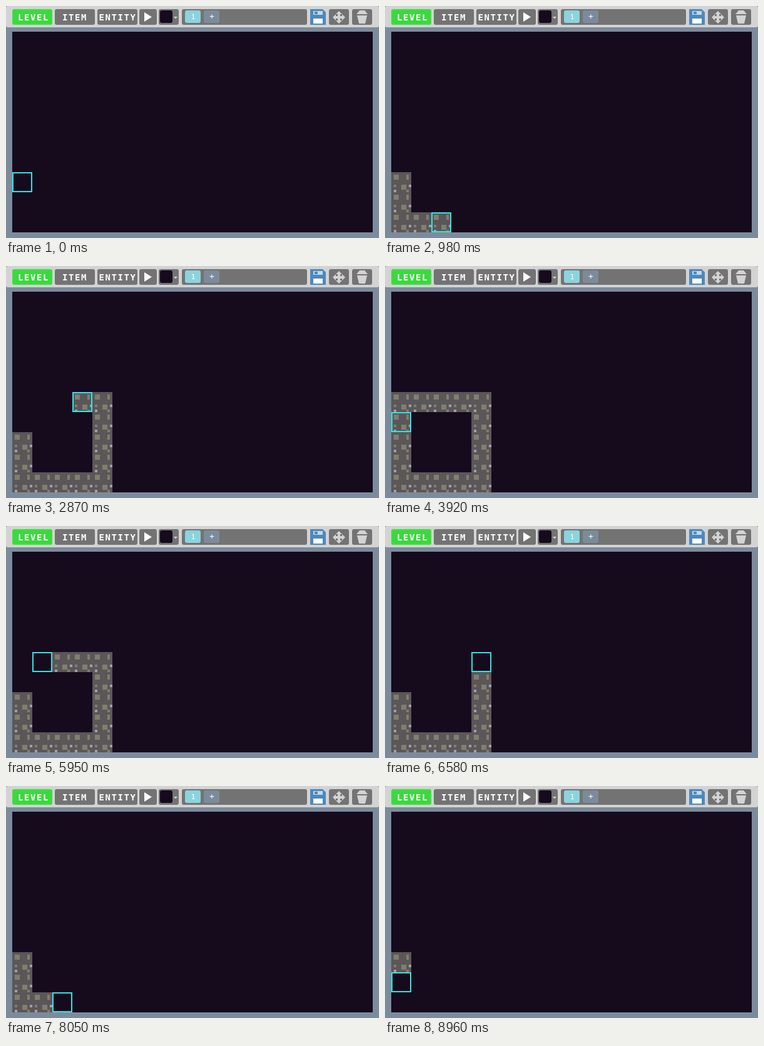
Write an HTML page that moves like this. It is 596 px wide and 370 px high and loops after 9310 ms.

```html
<!DOCTYPE html>
<html lang="en">
<head>
<meta charset="utf-8">
<title>Level editor</title>
<style>
  html, body { margin: 0; width: 100%; height: 100%; overflow: hidden; background: #7c8b9b; }
  svg { display: block; }
  text { fill: #fff; font: bold 14px "DejaVu Sans Mono", monospace; letter-spacing: 1.57px; }
  .tab { font-size: 11px; font-weight: normal; letter-spacing: 0; text-anchor: middle; }
  .button { fill: #737373; }
  .icon { fill: #d3d3d3; }
</style>
</head>
<body>
<svg width="596" height="370" viewBox="0 0 596 370">
  <defs>
    <g id="tile" shape-rendering="crispEdges">
      <path fill="#5b5758" d="M0 0h32v32H0z"/>
      <path fill="#827e70" d="M4 4h8v8H4zM24 4h4v8h-4zM4 20h4v4H4zM16 20h8v8h-8zM24 28h4v4h-4z"/>
      <path fill="#a09fb0" d="M28 20h4v4h-4zM4 28h4v4H4z"/>
    </g>
  </defs>

  <rect width="596" height="34" rx="3" fill="#d3d3d3"/>
  <rect x="11" y="6" width="62" height="23" rx="2" fill="#3dd740" stroke="#35e53a" stroke-width="2"/>
  <g class="button">
    <rect x="78" y="5" width="64" height="25" rx="3"/>
    <rect x="146" y="5" width="64" height="25" rx="3"/>
    <rect x="213" y="5" width="28" height="25" rx="3"/>
    <rect x="244" y="5" width="32" height="25" rx="3"/>
    <rect x="281" y="5" width="200" height="25" rx="3"/>
    <rect x="516" y="5" width="32" height="25" rx="3"/>
    <rect x="553" y="5" width="32" height="25" rx="3"/>
  </g>
  <text x="19" y="23">LEVEL</text>
  <text x="90" y="23">ITEM</text>
  <text x="148.500" y="23">ENTITY</text>
  <path fill="#fff" d="M221 10l12 7.500-12 7.500z"/>
  <rect x="246" y="7" width="20" height="20" rx="3" fill="#160a1d"/>
  <path class="icon" d="M268 17h6l-3 3.500z"/>
  <rect x="286" y="7" width="25" height="20" rx="3" fill="#8bd3de"/>
  <rect x="316" y="7" width="25" height="20" rx="3" fill="#7c8b9b"/>
  <text class="tab" x="299" y="21">1</text>
  <text class="tab" x="329" y="21" style="font-size:13px">+</text>

  <path fill="#4d89bd" d="M486 5h20l5 5v20h-25z"/>
  <path fill="#c3d8e8" d="M491 8h15v6h-15z"/>
  <path fill="#4d89bd" d="M493 9h5v4h-5z"/>
  <path fill="#fff" d="M491 20h15v8h-15z"/>
  <path class="icon" d="M532 8l5 5h-3v3h3v-3l5 5-5 5v-3h-3v3h3l-5 5-5-5h3v-3h-3v3l-5-5 5-5v3h3v-3h-3z"/>
  <path class="icon" d="M565 7h8l5 6h-18zM561 15h16l-3 13h-10z"/>

  <rect x="10" y="41" width="576" height="320" fill="#160a1d"/>
  <g transform="translate(10 41)">
    <g id="tiles"></g>
    <rect id="cursor" x="1" y="1" width="30" height="30" fill="none" stroke="#2ee5e5" stroke-width="2"/>
  </g>
</svg>
<script>
const LOOP = 9310, CELL = 32;
const NS = "http://www.w3.org/2000/svg";
const cursor = document.getElementById("cursor");
const tiles = document.getElementById("tiles");

// Cells around the room, walked forwards to paint and backwards to erase
const moves = "DDRRRRUUUULLLLD";
const steps = { D: [0, 1], U: [0, -1], R: [1, 0], L: [-1, 0] };
const path = [[0, 7]];
for (const move of moves) {
  const [x, y] = path[path.length - 1], [dx, dy] = steps[move];
  path.push([x + dx, y + dy]);
}

const paintTimes = [70, 350, 560, 840, 980, 1260, 1610, 2030,
  2240, 2450, 2660, 2870, 3080, 3290, 3500, 3920];
const eraseTimes = [5320, 5390, 5950, 6160, 6300, 6510, 6650, 6860,
  7280, 7560, 7840, 7980, 8120, 8540, 8960];

const walls = path.map(([x, y]) => {
  const wall = document.createElementNS(NS, "use");
  wall.setAttribute("href", "#tile");
  wall.setAttribute("transform", `translate(${x * CELL} ${y * CELL})`);
  return tiles.appendChild(wall);
});

const countPast = (times, t) => times.filter(time => time <= t).length;

function draw(now) {
  const t = now % LOOP;
  const painted = countPast(paintTimes, t);
  const erased = countPast(eraseTimes, t);
  const last = path.length - 1;
  walls.forEach((wall, i) => {
    wall.style.display = i < painted && i <= last - erased ? "" : "none";
  });
  const at = erased ? path.length - erased : Math.max(0, painted - 1);
  const [x, y] = path[at];
  cursor.setAttribute("transform", `translate(${x * CELL} ${y * CELL})`);
  requestAnimationFrame(draw);
}
draw(performance.now());
</script>
</body>
</html>
```
